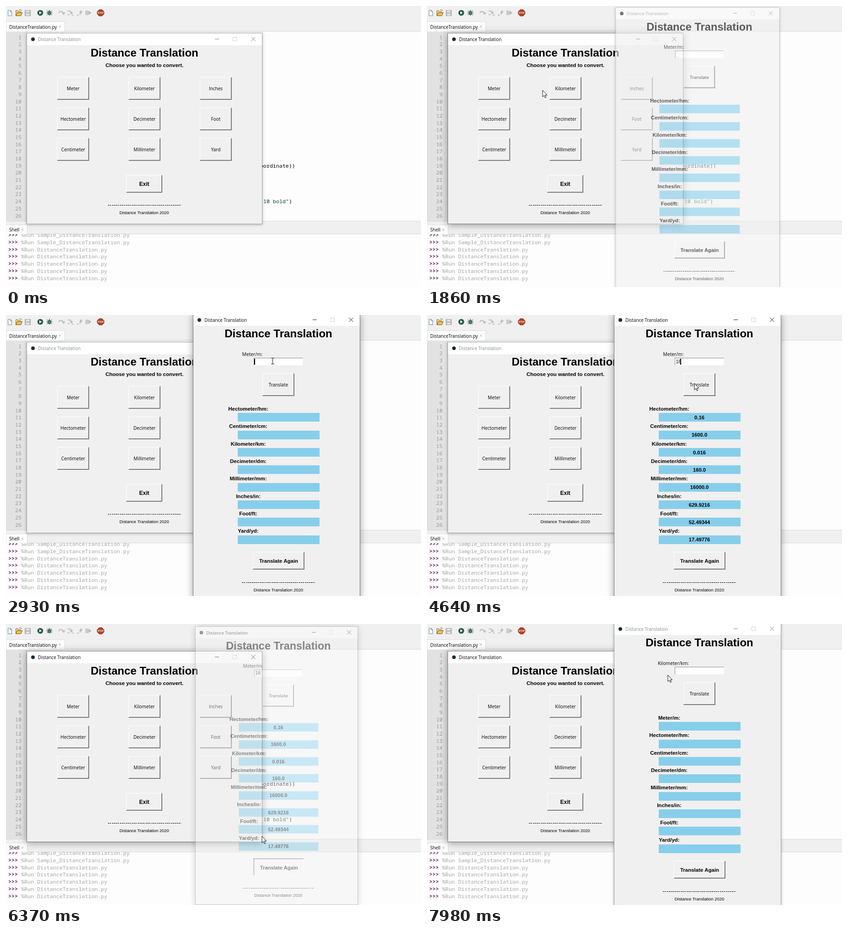
Animation of 908 by 617 pixels, one loop 8000 ms. Source, as an HTML page:

```html
<!DOCTYPE html>
<html lang="en">
<head>
<meta charset="utf-8">
<title>Distance Translation</title>
<style>
html, body { margin: 0; width: 100%; height: 100%; overflow: hidden; background: #fdfdfd; }
#stage { position: relative; width: 908px; height: 617px; overflow: hidden; background: #fdfdfd; color: #000; font-kerning: none; }
#stage div, #stage svg { position: absolute; }
.t { height: 20px; line-height: 20px; white-space: pre; }
.c { width: 300px; text-align: center; }
.ui { font: 10px/20px "Open Sans", "Noto Sans", sans-serif; }
.cap { font: 9.9px/20px "Open Sans", "Noto Sans", sans-serif; }
.from { font: 10.3px/20px "Open Sans", "Noto Sans", sans-serif; }
.code { font: 11.65px/20px "Noto Sans Mono", "DejaVu Sans Mono", monospace; }
.head { font: bold 24.1px/20px "Liberation Sans", Arial, sans-serif; }
.bold { font: bold 11.5px/20px "Liberation Sans", Arial, sans-serif; }
.val { font: bold 11.2px/20px "Liberation Sans", Arial, sans-serif; }
.exit { font: bold 12px/20px "Liberation Sans", Arial, sans-serif; }
.foot { font: 9.4px/20px "Liberation Sans", Arial, sans-serif; }
.in { font: 10.4px/20px "Liberation Sans", Arial, sans-serif; }
.num { width: 34px; text-align: right; color: #999; }
.dim { color: #a6a6a6; }
.prompt { color: #6d2a63; font-weight: bold; }
.str { color: #024a14; }
.win { background: #f0f0f0; outline: 1px solid #a4a4a4; outline-offset: -1px; box-shadow: 0 1px 6px rgba(0,0,0,.3); }
.win.on { outline-color: #757575; box-shadow: 0 2px 15px rgba(0,0,0,.38); }
.bar { background: #fff; }
.win .name { color: #858c8c; }
.win.on .name { color: #000; }
.ctl { fill: none; stroke: #808080; }
.on .ctl { stroke: #1a1a1a; }
.btn { box-sizing: border-box; border: 1px solid #fff; border-right: 2px solid #7b7b7b; border-bottom: 2px solid #7b7b7b; }
.btn.down { border: 1px solid #fff; border-top: 2px solid #7b7b7b; border-left: 2px solid #7b7b7b; }
.down + .t { margin: 1px 0 0 1px; }
.dash { width: 160px; height: 1px; background: repeating-linear-gradient(90deg, #000 0 3px, transparent 3px 4.3px); }
.sky { width: 179px; height: 19px; background: #87ceeb; }
.entry { box-sizing: border-box; width: 108px; height: 17px; background: #fff; border: 1px solid #f4f4f4; border-top-color: #8a8a8a; border-left-color: #8a8a8a; }
.raw .soft { color: transparent; }
.raw .late { background: #fff; }
</style>
</head>
<body>
<div id="stage"></div>
<script>
const stage = document.getElementById("stage");

function box(parent, cls, x, y, w, h, bg) {
  const d = document.createElement("div");
  d.className = cls;
  d.style.left = x + "px";
  d.style.top = y + "px";
  if (w) { d.style.width = w + "px"; d.style.height = h + "px"; }
  if (bg) d.style.background = bg;
  parent.append(d);
  return d;
}
function text(parent, str, x, cy, cls) {
  const d = box(parent, "t " + cls, x, cy - 10);
  d.textContent = str;
  return d;
}
const mid = (parent, str, cx, cy, cls) => text(parent, str, cx - 150, cy, "c " + cls);

function svg(parent, x, y, w, h, body) {
  parent.insertAdjacentHTML("beforeend",
    `<svg style="left:${x}px;top:${y}px" width="${w}" height="${h}">${body}</svg>`);
  return parent.lastElementChild;
}

function button(parent, str, x, y, w, h, cls = "ui") {
  const b = box(parent, "btn", x, y, w, h);
  mid(parent, str, x + w / 2, y + h / 2, cls);
  return b;
}

function makeWindow(x, y, w, h) {
  const win = box(stage, "win", x, y, w, h);
  const body = box(win, "", -x, -y);
  box(body, "bar", x + 1, y + 1, w - 2, 26);
  box(body, "", x + 10, y + 9.5, 8, 8, "#1d2b3c").style.borderRadius = "50%";
  text(body, "Distance Translation", x + 25, y + 13.5, "cap name");
  svg(body, x + w - 105, y + 8, 92, 11,
    `<path class="ctl" d="M1 5.5H10M80.5 1L89.5 10M89.5 1L80.5 10"/><rect x="40.5" y="1.5" width="8" height="8" fill="none" stroke="#cfcfcf"/>`);
  return { win, body };
}

function footer(body, cx, y) {
  box(body, "dash", cx - 80, y);
  mid(body, "Distance Translation 2020", cx, y + 17, "foot");
}

// Editor
box(stage, "", 0, 0, 908, 55, "#f0f0f0");
box(stage, "", 0, 55, 908, 1, "#d4d4d4");
box(stage, "", 1, 35, 127, 21, "#fdfdfd").style.boxShadow = "0 0 0 1px #dcdcdc";
box(stage, "", 0, 56, 46, 416, "#e2e2e2");
text(stage, "DistanceTranslation.py", 7, 45.5, "cap");
text(stage, "×", 115, 45, "ui dim");
for (let i = 0; i < 26; i++) text(stage, i + 1, 0, 68.5 + i * 15.68, "code num");
text(stage, "oordinate))", 556, 350.5, "code");
text(stage, "10 bold\"", 563, 428.7, "code str");
text(stage, ")", 619, 428.7, "code");

// Toolbar
svg(stage, 0, 4, 220, 22, `
<path d="M4.5 5.5h5l3 3v9h-8z" fill="#fff" stroke="#5b87a0"/><path d="M9.5 5.5v3h3" fill="none" stroke="#5b87a0"/>
<path d="M21.5 17V6h4l1 2h5v3" fill="#f5d888" stroke="#8a6a2c"/><path d="M21.5 17.5l3-7h11l-3 7z" fill="#f2c14e" stroke="#6d5220"/>
<path d="M29 5q4-2 5 2" fill="none" stroke="#555"/>
<path d="M41.5 5.5h12v12h-12z" fill="#bdbdbd" stroke="#a9a9a9"/><path d="M44 6h7v4h-7zM44 13h7v4h-7z" fill="#e6e6e6"/>
<circle cx="75" cy="11" r="6.3" fill="#285a4c"/><path d="M73 7.5l5 3.5-5 3.5z" fill="#fff"/>
<path d="M89 6l12 10M101 6L89 16M88 11h14M95 4v3" stroke="#34584f" fill="none"/><ellipse cx="95" cy="11.5" rx="3.3" ry="4.4" fill="#4c8073" stroke="#27463f"/>
<g fill="none" stroke="#bcbcbc" stroke-width="2"><path d="M116 12q0-4 4-4t6 4M123 10l3 4 3-4"/><path d="M135 7h5q3 0 3 5M140 10l3 3 3-3M135 15h4M144 16h4"/><path d="M155 16h4M162 15V9h4M163 6l3 3-3 3"/></g>
<path d="M174 6h2v10h-2zM177 6h2v10h-2zM180 6l7 5-7 5z" fill="#b8b8b8"/>
<path d="M204 4h6l4.5 4.5v5l-4.5 4.5h-6l-4.5-4.5v-5z" fill="#b5401f" stroke="#7a3219"/>
<text x="207" y="13" font-size="5" font-weight="bold" font-family="Liberation Sans, sans-serif" text-anchor="middle" fill="#fff">STOP</text>`);

// Shell
for (let i = 0; i < 7; i++) {
  const y = 503 + i * 15.75;
  text(stage, ">>>", 5, y, "code prompt");
  text(stage, `%Run ${i < 2 ? "Sample_" : ""}DistanceTranslation.py`, 33, y, "code dim");
}
box(stage, "", 0, 472, 908, 28, "#f0f0f0");
box(stage, "", 0, 472, 908, 1, "#d8d8d8");
box(stage, "", 0, 500, 908, 1, "#d8d8d8");
box(stage, "", 1, 481, 45, 20, "#fdfdfd").style.boxShadow = "0 -1px 0 #dcdcdc, 1px 0 0 #dcdcdc";
text(stage, "Shell", 7, 491, "ui");
text(stage, "×", 33, 490.5, "ui dim");

// Menu window
const menu = makeWindow(45, 59, 516, 420);
mid(menu.body, "Distance Translation", 303, 102.5, "head");
mid(menu.body, "Choose you wanted to convert.", 303, 129.5, "bold");
const units = ["Meter", "Kilometer", "Inches", "Hectometer", "Decimeter", "Foot", "Centimeter", "Millimeter", "Yard"];
const unitBtns = units.map((u, i) =>
  button(menu.body, u, 112 + (i % 3) * 156, 156 + Math.floor(i / 3) * 67, 70, 50));
button(menu.body, "Exit", 263, 371, 79, 39, "exit");
footer(menu.body, 302.5, 437);

// Converter window
const conv = makeWindow(409, -3, 366, 628);
mid(conv.body, "Distance Translation", 596, 41, "head soft");
const from = mid(conv.body, "", 539, 85.5, "from soft");
box(conv.body, "entry", 542, 94);
const typed = text(conv.body, "", 544.5, 102.5, "in");
const caret = box(conv.body, "", 543, 96, 1.6, 13, "#000");
const go = button(conv.body, "Translate", 561, 128, 70, 50);
const rows = Array.from({ length: 8 }, (_, i) => {
  const y = 225 + i * 38.35;
  box(conv.body, i < 4 ? "sky late" : "sky", 507, Math.round(y - 9.7));
  return {
    label: mid(conv.body, "", 530, y - 19, "bold soft"),
    value: mid(conv.body, "", 596, y, "val")
  };
});
const again = button(conv.body, "Translate Again", 540, 520, 113, 39, "bold");
footer(conv.body, 596, 587);

const rest = ["Decimeter/dm:", "Millimeter/mm:", "Inches/in:", "Foot/ft:", "Yard/yd:"];
const meterRows = ["Hectometer/hm:", "Centimeter/cm:", "Kilometer/km:", ...rest];
const kiloRows = ["Meter/m:", "Hectometer/hm:", "Centimeter/cm:", ...rest];
const perMeter = [.01, 100, .001, 10, 1000, 39.3701, 3.28084, 1.09361];

function convert(meters, factor) {
  const v = +(meters * factor).toFixed(5);
  return Number.isInteger(v) ? v + ".0" : String(v);
}

const arrow = svg(stage, -1, -1, 14, 21,
  `<path d="M1 1V15.4L4.3 12.4 6.5 17.4 8.6 16.5 6.4 11.6H10.7Z" fill="#fff" stroke="#111"/>`);
const beam = svg(stage, -4, -8, 9, 16,
  `<path d="M1 1.5H8M4.5 2V14M1 14.5H8" fill="none" stroke="#111"/>`);

// Timeline
const LOOP = 8000, STEP = 77.5, FADE = 190;
const enter = { t: 70, x: 803, y: 590 };
const press = { meter: 1610, entry: 2780, go: 4490, again: 6100, kilo: 7510 };
const open1 = 1736, close = 6241, open2 = 7549;

// Pointer moves: start, end, x, y
const moves = [[70, 830, 193, 220], [910, 1310, 140, 173], [1640, 1850, 253, 185], [1850, 2600, 583, 101],
  [3710, 4340, 585, 150], [5030, 5950, 624, 540], [6090, 6990, 303, 168], [7440, 7580, 320, 176], [7590, 7970, 527, 112]];

const ramp = (t, a, d) => Math.min(1, Math.max(0, (t - a) / d));
const ease = k => k * k * (3 - 2 * k);
const within = (t, a, b) => t >= a && t < b;
const toggle = (el, cls, on) => el.classList.toggle(cls, on);
const show = (el, on) => { el.style.display = on ? "" : "none"; };

function pointer(t) {
  let { x, y } = enter;
  for (const [a, b, tx, ty] of moves) {
    const k = ease(ramp(t, a, b - a));
    x += (tx - x) * k;
    y += (ty - y) * k;
  }
  return [Math.round(x), Math.round(y)];
}

function draw(t) {
  const tick = enter.t + STEP * Math.floor((t - enter.t) / STEP);
  const alpha = ramp(tick, open1, FADE) - ramp(tick, close, FADE) + ramp(tick, open2, FADE);
  const [x, y] = pointer(tick);
  const overEntry = alpha > .5 && within(x, 543, 650) && within(y, 95, 111);
  show(arrow, t >= enter.t && !overEntry);
  show(beam, overEntry);
  arrow.style.transform = beam.style.transform = `translate(${x}px,${y}px)`;

  show(conv.win, alpha > 0);
  conv.win.style.opacity = alpha;
  conv.win.style.transform = alpha < 1 ? `scale(${.953 + .047 * alpha})` : "none";
  toggle(conv.win, "raw", alpha < .3 && !within(t, press.entry, press.kilo));
  toggle(conv.win, "on", within(t, press.entry, press.kilo));
  toggle(menu.win, "on", within(t, 1140, press.entry) || t >= close);

  toggle(unitBtns[0], "down", within(t, press.meter, press.meter + STEP));
  toggle(unitBtns[1], "down", within(t, press.kilo, press.kilo + STEP));
  toggle(go, "down", within(t, press.go, press.go + 2 * STEP - 10));
  toggle(again, "down", within(t, press.again, press.kilo));

  const kilo = t >= press.kilo, names = kilo ? kiloRows : meterRows;
  const solved = within(t, press.go + STEP, press.kilo);
  from.textContent = kilo ? "Kilometer/km:" : "Meter/m:";
  rows.forEach((r, i) => {
    r.label.textContent = names[i];
    r.value.textContent = solved ? convert(16, perMeter[i]) : "";
  });
  typed.textContent = kilo ? "" : "16".slice(0, (t >= 3240) + (t >= 3560));
  caret.style.left = 543 + typed.textContent.length * 5.6 + "px";
  // 600 ms on, 300 ms off
  show(caret, within(t, press.entry, close) && (t + 800) % 900 < 600);
}

const start = performance.now();
function loop() {
  draw((performance.now() - start) % LOOP);
  requestAnimationFrame(loop);
}
loop();
</script>
</body>
</html>
```
